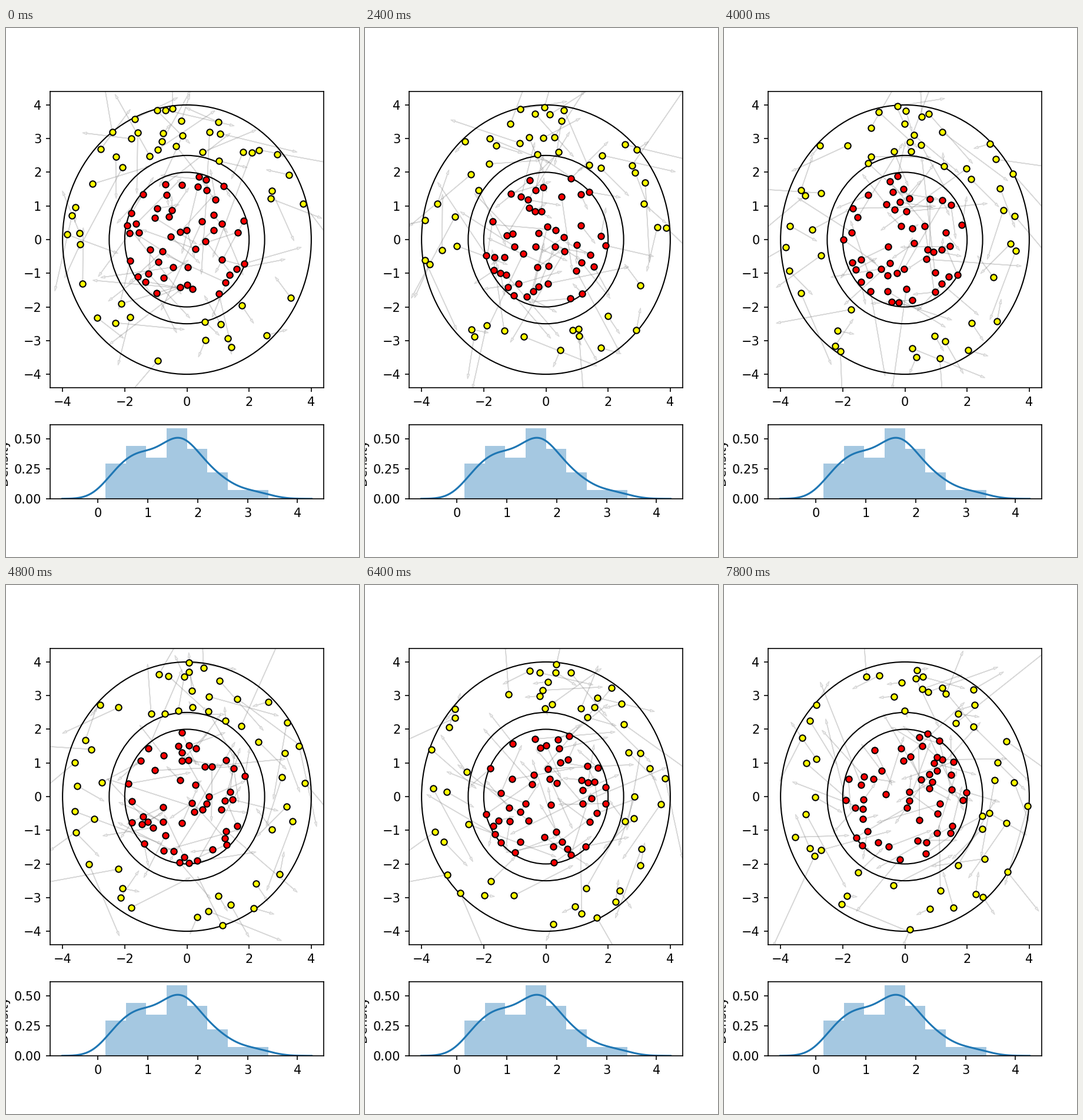
A matplotlib script that plays this animation: 600 px wide and 900 px high, repeating every 8 s.

```python
import numpy as np
import matplotlib.pyplot as plt
from matplotlib.animation import FuncAnimation
from matplotlib.collections import PolyCollection
from matplotlib.patches import Circle

FRAMES, INTERVAL = 40, 200
DT, SUBSTEPS = 0.05, 10
COUNT = 50  # particles in each gas
DIAMETER = 0.2
LIM = 4.4
BIN_START, BIN_WIDTH = 0.152, 0.408
BIN_COUNTS = np.array([12, 18, 14, 24, 17, 9, 3, 3])
BIN_SKEW = [0.9, 0.8, 0.8, 1, 1.4, 1, 1, 1]
rng = np.random.default_rng(7)


def speed_sample():
    """Spread each bin's particles over its width, some leaning to one side."""
    edges = BIN_START + BIN_WIDTH * np.arange(len(BIN_COUNTS))
    return np.concatenate([e + BIN_WIDTH * ((np.arange(n) + 0.5) / n) ** p
                           for e, n, p in zip(edges, BIN_COUNTS, BIN_SKEW)])


def scatter_points(r_min, r_max, heavy, bias):
    """Random, non-touching points in a ring, denser toward the heavy direction."""
    points = []
    while len(points) < COUNT:
        r = np.sqrt(rng.uniform(r_min ** 2, r_max ** 2))
        angle = rng.uniform(0, 2 * np.pi)
        weight = 1 + bias * np.cos(angle - heavy) * r / r_max
        p = r * np.array([np.cos(angle), np.sin(angle)])
        apart = all(np.hypot(*(p - q)) > 1.1 * DIAMETER for q in points)
        if apart and rng.uniform(0, 1 + bias) < weight:
            points.append(p)
    return np.array(points)


def headings(speeds, mean, spread):
    angle = rng.normal(mean, spread, len(speeds))
    return speeds[:, None] * np.column_stack([np.cos(angle), np.sin(angle)])


def bounce_wall(pos, vel, radius, side):
    """Reflect particles past a circle; side is 1 for an outer wall, -1 for an inner one."""
    r = np.hypot(*pos.T)
    normal = pos / np.maximum(r, 1e-9)[:, None]
    speed = np.sum(vel * normal, axis=1)
    hit = (side * (r - radius) > 0) & (side * speed > 0)
    vel[hit] -= 2 * speed[hit, None] * normal[hit]


def bounce_pairs(pos, vel):
    gap = pos[:, None] - pos[None]
    dist = np.hypot(gap[..., 0], gap[..., 1])
    for i, j in np.argwhere(np.triu(dist < DIAMETER, 1)):
        normal = gap[i, j] / dist[i, j]
        closing = (vel[i] - vel[j]) @ normal
        if closing < 0:
            vel[i] -= closing * normal
            vel[j] += closing * normal


def simulate(pos, vel, walls):
    states = []
    for _ in range(FRAMES):
        states.append((pos.copy(), vel.copy()))
        for _ in range(SUBSTEPS):
            pos += vel * DT / SUBSTEPS
            bounce_pairs(pos, vel)
            for radius, side in walls:
                bounce_wall(pos, vel, radius, side)
    return states


def arrow_shapes(pos, vel, head=0.13, half=0.035):
    speed = np.maximum(np.hypot(*vel.T), 1e-6)[:, None]
    along = vel / speed
    across = along[:, ::-1] * [-half, half]
    tip = pos + vel
    neck = tip - head * along
    return np.stack([pos, neck, neck + across, tip, neck - across, neck], axis=1)


def draw_density(ax, speeds, band=0.29):
    edges = BIN_START + BIN_WIDTH * np.arange(len(BIN_COUNTS))
    ax.bar(edges, BIN_COUNTS / BIN_COUNTS.sum() / BIN_WIDTH, BIN_WIDTH,
           align="edge", color="tab:blue", alpha=0.4, linewidth=0)
    x = np.linspace(edges[0] - 3 * band, edges[-1] + BIN_WIDTH + 3 * band, 200)
    z = (x[:, None] - speeds) / band
    y = np.exp(-z ** 2 / 2).mean(axis=1) / (band * np.sqrt(2 * np.pi))
    ax.plot(x, y, color="tab:blue", lw=1.5)
    ax.set(xlim=(-0.961, 4.527), ylim=(0, 0.6177), ylabel="Density",
           xticks=range(5), yticks=[0, 0.25, 0.5])


speeds = speed_sample()
mixed = rng.permutation(speeds)
inner = simulate(scatter_points(0, 2, np.radians(110), 0.8),
                 headings(mixed[:COUNT], np.radians(-45), 1.6), [(2, 1)])
outer = simulate(scatter_points(2.5, 4, np.radians(125), 0.7),
                 headings(mixed[COUNT:], 0, 3), [(4, 1), (2.5, -1)])

fig = plt.figure(figsize=(4, 6), dpi=150)
gas = fig.add_axes([0.125, 0.32, 0.775, 0.56])
gas.set(xlim=(-LIM, LIM), ylim=(-LIM, LIM),
        xticks=range(-4, 5, 2), yticks=range(-4, 5))
for radius in (2, 2.5, 4):
    gas.add_patch(Circle((0, 0), radius, fill=False, ec="black", lw=1, zorder=2))
arrows = PolyCollection([], facecolor="none", edgecolor=(0.5, 0.5, 0.5, 0.3),
                        linewidth=0.75, zorder=1)
gas.add_collection(arrows, autolim=False)
dot = dict(ls="", marker="o", ms=5, mec="black", mew=1, zorder=3)
red, = gas.plot([], [], mfc="red", **dot)
yellow, = gas.plot([], [], mfc="yellow", **dot)
draw_density(fig.add_axes([0.125, 0.11, 0.775, 0.14]), speeds)


def update(i):
    (p_in, v_in), (p_out, v_out) = inner[i], outer[i]
    red.set_data(*p_in.T)
    yellow.set_data(*p_out.T)
    arrows.set_verts(arrow_shapes(np.vstack([p_in, p_out]), np.vstack([v_in, v_out])))
    return arrows, red, yellow


anim = FuncAnimation(fig, update, frames=FRAMES, interval=INTERVAL,
                     repeat=True, repeat_delay=0)
plt.show()
```
